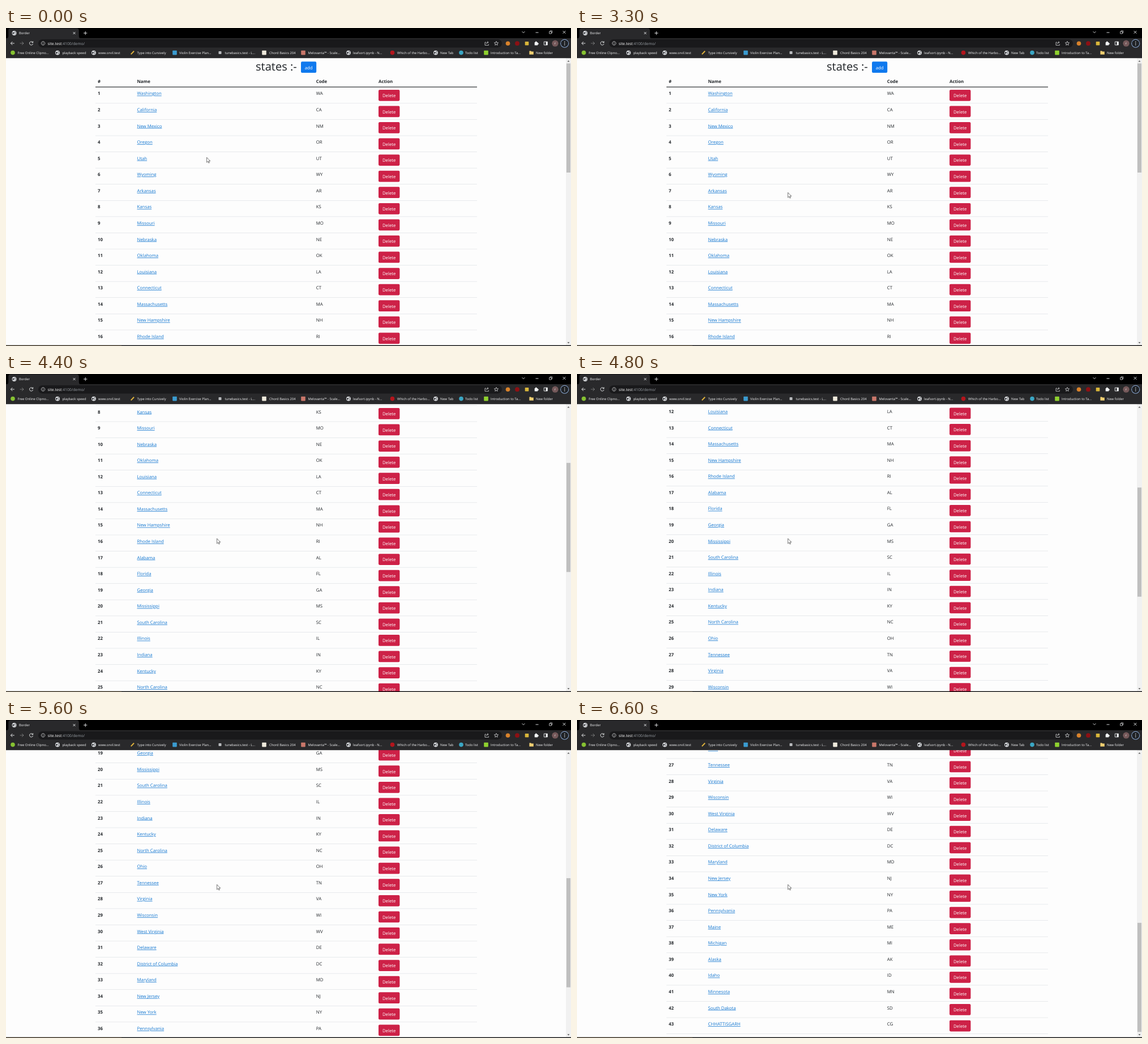
Animation, 998 px wide and 561 px high, one loop 7500 ms. Source, as an HTML page:

```html
<!DOCTYPE html>
<html lang="en">
<head>
<meta charset="utf-8">
<title>States</title>
<style>
  html, body { margin: 0; width: 100%; height: 100%; overflow: hidden; background: #fdfdfd; }
  svg { display: block; width: 100vw; height: 100vh; }
  text { font: 7.8px "Open Sans", "Noto Sans", sans-serif; fill: #212529; text-rendering: geometricPrecision; white-space: pre; }
  .bold { font-weight: 700; }
  .link { fill: #1276d0; text-decoration: underline; text-decoration-thickness: .6px; }
  .btn { fill: #fff; text-anchor: middle; }
  .title { font-size: 20.1px; }
  .ui { font-size: 5.85px; fill: #f6f7f8; }
  .url { font-size: 6.8px; fill: #fff; }
  .dim { fill: #9aa0a6; }
  .line { fill: none; stroke: #f1f3f4; stroke-width: .9; }
  .thin { stroke-width: .7; }
</style>
</head>
<body>
<svg id="stage" viewBox="0 0 998 561" preserveAspectRatio="none"></svg>
<script>
const LOOP = 7500, STEP = 100;
const PX = 561 / 1080;              // one page pixel on the stage
const ROW = 55 * PX, TOP = 104.5;
const BAR = '#29292b';

const states = `Washington WA,California CA,New Mexico NM,Oregon OR,Utah UT,Wyoming WY,Arkansas AR,Kansas KS,
Missouri MO,Nebraska NE,Oklahoma OK,Louisiana LA,Connecticut CT,Massachusetts MA,New Hampshire NH,Rhode Island RI,
Alabama AL,Florida FL,Georgia GA,Mississippi MS,South Carolina SC,Illinois IL,Indiana IN,Kentucky KY,
North Carolina NC,Ohio OH,Tennessee TN,Virginia VA,Wisconsin WI,West Virginia WV,Delaware DE,
District of Columbia DC,Maryland MD,New Jersey NJ,New York NY,Pennsylvania PA,Maine ME,Michigan MI,Alaska AK,
Idaho ID,Minnesota MN,South Dakota SD,CHHATTISGARH CG`.split(',').map(s => s.trim());

const text = (x, y, s, cls = '') => `<text x="${x}" y="${y}" class="${cls}">${s}</text>`;
const rect = (x, y, w, h, fill, r = 0, id = '') =>
  `<rect id="${id}" x="${x}" y="${y}" width="${w}" height="${h}" rx="${r}" fill="${fill}"/>`;
const dot = (x, y, r, fill) => `<circle cx="${x}" cy="${y}" r="${r}" fill="${fill}"/>`;
const line = (d, cls = '', style = '') => `<path class="line ${cls}" d="${d}" style="${style}"/>`;
const shape = (d, fill) => `<path d="${d}" fill="${fill}"/>`;
const square = (x, y, fill, s = 7.6) => rect(x - s / 2, y - s / 2, s, s, fill, .8);
const globe = (x, y) => dot(x, y, 3.9, '#e8eaed') +
  shape(`M${x - 2.8} ${y - 1.7}l2.3 .3 .8 1.5-1.5 1.1-.2 1.6-1.6-1.6zM${x + .8} ${y - 2.9}l1.9 1.4-1 1.1-1.2-.8zM${x + .6} ${y + 1}l2.2-.6-1.5 2.4z`, '#3c3e42');

function button(x, y, w, label, fill) {
  return rect(x, y, w, 38 * PX, fill, 2.1) + text(x + w / 2, y + 13.3, label, 'btn');
}

function row(entry, i) {
  const y = TOP + i * ROW, base = y + 13.9;
  return text(162, base, i + 1, 'bold') +
    text(231.5, base, entry.slice(0, -3), 'link') +
    text(547.8, base, entry.slice(-2)) +
    button(658, y + 4.4, 37.4, 'Delete', '#cd2147') +
    rect(158, y + ROW - .5, 674, .6, '#d9dde1');
}

function page() {
  const heads = [[162, '#'], [231.5, 'Name'], [547.8, 'Code'], [658, 'Action']];
  return text(441, 74.7, 'states :-', 'title') +
    button(521, 59.3, 27.2, 'add', '#0f79ee') +
    heads.map(([x, s]) => text(x, 97, s, 'bold')).join('') +
    rect(158, 103.5, 674, 1.2, '#2b2e31') +
    states.map(row).join('');
}

function scrollbar() {
  return rect(989, 53, 9, 507, '#f1f1f1') +
    rect(990, 62.5, 7, 192.5, '#bfbfbf', 0, 'thumb') +
    shape('M991.5 59.5l2-2.2 2 2.2zM991.5 554.3l2 2.2 2-2.2z', '#555');
}

function tabStrip() {
  return rect(0, 0, 998, 18.5, '#000') +
    shape('M0 18.5Q4.2 18.5 4.2 14.3V4.7Q4.2 .5 8.4 .5H124.6Q128.8 .5 128.8 4.7V14.3Q128.8 18.5 133 18.5Z', BAR) +
    globe(14.5, 9) + text(23, 11.2, 'Border', 'ui') +
    line('M118.5 7l4 4m0-4l-4 4M137 9h6.4M140.2 5.8v6.4') +
    line('M911.6 6.2l2.4 2.4 2.4-2.4M935.5 8h5') +
    line('M959.7 6.3h3.7v3.7h-3.7zM961 6.1v-1.2h3.7v3.7h-1.2', 'thin') +
    line('M983.6 5l4.8 4.8m0-4.8l-4.8 4.8');
}

function toolbar() {
  return rect(0, 18, 998, 35.2, BAR) +
    rect(57, 20, 819, 14.4, '#19191b', 7.2) +
    line('M14.8 27h-6.4m3-3l-3 3 3 3') +
    line('M24.6 27h6.4m-3-3l3 3-3 3', '', 'opacity:.4') +
    line('M47.3 25.4a3.1 3.1 0 1 0 .3 2.5M47.7 23.4v2.4h-2.4') +
    line('M65.5 23.8a3.2 3.2 0 1 0 .01 0M65.5 26.6v2.2M65.5 25v.8', 'thin') +
    text(73.5, 29.5, 'site.test<tspan class="dim">:4100/demo/</tspan>', 'url') +
    line('M848 25.2h-2v5.2h6.4v-2M848 28q.4-2.7 3.8-2.7m-1.7-1.7l2 1.7-2 1.7', 'thin') +
    line('M866 23.5l1 2.4 2.6 .2-2 1.7 .6 2.5-2.2-1.4-2.2 1.4 .6-2.5-2-1.7 2.6-.2z', 'thin') +
    dot(886.5, 27.2, 3.8, '#d9822b') + dot(903, 27.2, 3.9, '#8c1014') + square(920, 27.2, '#d8b63a', 6.6) +
    rect(933.7, 25, 5.6, 5.6, '#f1f3f4', .7) + dot(936.3, 24.7, 1.3, '#f1f3f4') + dot(939.6, 27.8, 1.3, '#f1f3f4') +
    line('M950.3 24.2h6v5.8h-6z') + rect(953.6, 24.2, 2.8, 5.8, '#f1f3f4') +
    dot(970, 27.2, 5.6, '#75595a') + text(968.7, 29, 'r', 'ui') +
    dot(986.7, 27.2, 7.5, '#8aa9d6') + dot(986.7, 27.2, 6.5, '#1f2226') +
    [24.6, 27.2, 29.8].map(y => dot(986.7, y, .75, '#f1f3f4')).join('');
}

function bookmarks() {
  const y = 43.6;
  const disc = c => x => dot(x, y, 3.8, c);
  const box = (c, size) => x => square(x, y, c, size);
  const world = x => globe(x, y);
  const pen = x => line(`M${x - 2.8} ${y + 2.8}l5.4-5.6`, '', 'stroke:#e0b23c;stroke-width:2');
  const folder = x => shape(`M${x - 3.6} ${y - 3}h2.8l1 1h3.6v5.2h-7.4z`, '#f0cf72');
  return [
    [12, 20.5, 'Free Online Clipno...', disc('#86c232')],
    [91, 99.5, 'playback speed', world],
    [155, 163, 'www.orvil.test', world],
    [223.5, 231.5, 'Type into Cursively', pen],
    [298, 306, 'Violin Exercise Plan...', box('#3a9bd0')],
    [378, 386.5, 'tunebasics.test - L...', box('#b9bbbe', 5)],
    [456, 465, 'Chord Basics 204', box('#eee9dc')],
    [525, 533.5, 'Melovanta™ - Scale...', box('#c9776a')],
    [605, 613, 'leafsort.ipynb - N...', world],
    [682.5, 691, 'Which of the Harbo...', disc('#b3151d')],
    [759, 767, 'New Tab', world],
    [804, 811, 'Todo list', disc('#3aa6c4')],
    [848, 856, 'Introduction to Ta...', box('#8fd12f')],
    [928, 936, 'New folder', folder]
  ].map(([ix, tx, label, icon]) => icon(ix) + text(tx, 45.8, label, 'ui')).join('');
}

const stage = document.getElementById('stage');
stage.innerHTML = rect(0, 0, 998, 561, '#fdfdfd') +
  `<g id="page">${page()}</g>` + scrollbar() + tabStrip() + toolbar() + bookmarks() +
  rect(0, 559.6, 998, 1.4, '#0d0d0d') + rect(0, 560, 204, 1, '#3b2d18') +
  '<path id="cursor" d="M0 0V17L4 13.3L6.5 19L9 18L6.6 12.3H12Z" fill="#fff" stroke="#111" stroke-width="1.1"/>';

const [pageEl, thumb, cursor] = ['page', 'thumb', 'cursor'].map(id => document.getElementById(id));

// Wheel bursts: start, end, distance in page pixels, easing skew.
const bursts = [
  [3430, 4000, 400, .9],
  [4230, 4800, 300, .9],
  [4945, 5600, 400, 1],
  [5947, 6600, 400, .8]
];

const clamp = u => Math.min(1, Math.max(0, u));
const smooth = u => u * u * (3 - 2 * u);
const progress = (t, a, b, skew = 1) => smooth(clamp((t - a) / (b - a)) ** skew);

function draw(time) {
  const t = Math.floor((time % LOOP) / STEP) * STEP;
  const scroll = PX * bursts.reduce((sum, [a, b, d, skew]) => sum + d * progress(t, a, b, skew), 0);
  const move = progress(t, 2200, 3300);
  pageEl.setAttribute('transform', `translate(0 ${-scroll})`);
  thumb.setAttribute('y', 62.5 + scroll * .379);
  cursor.setAttribute('transform', `translate(${354.6 + 18 * move} ${228.3 + 62 * move}) scale(${PX})`);
}

const start = performance.now();
function tick() {
  draw(performance.now() - start);
  requestAnimationFrame(tick);
}
tick();
</script>
</body>
</html>
```
